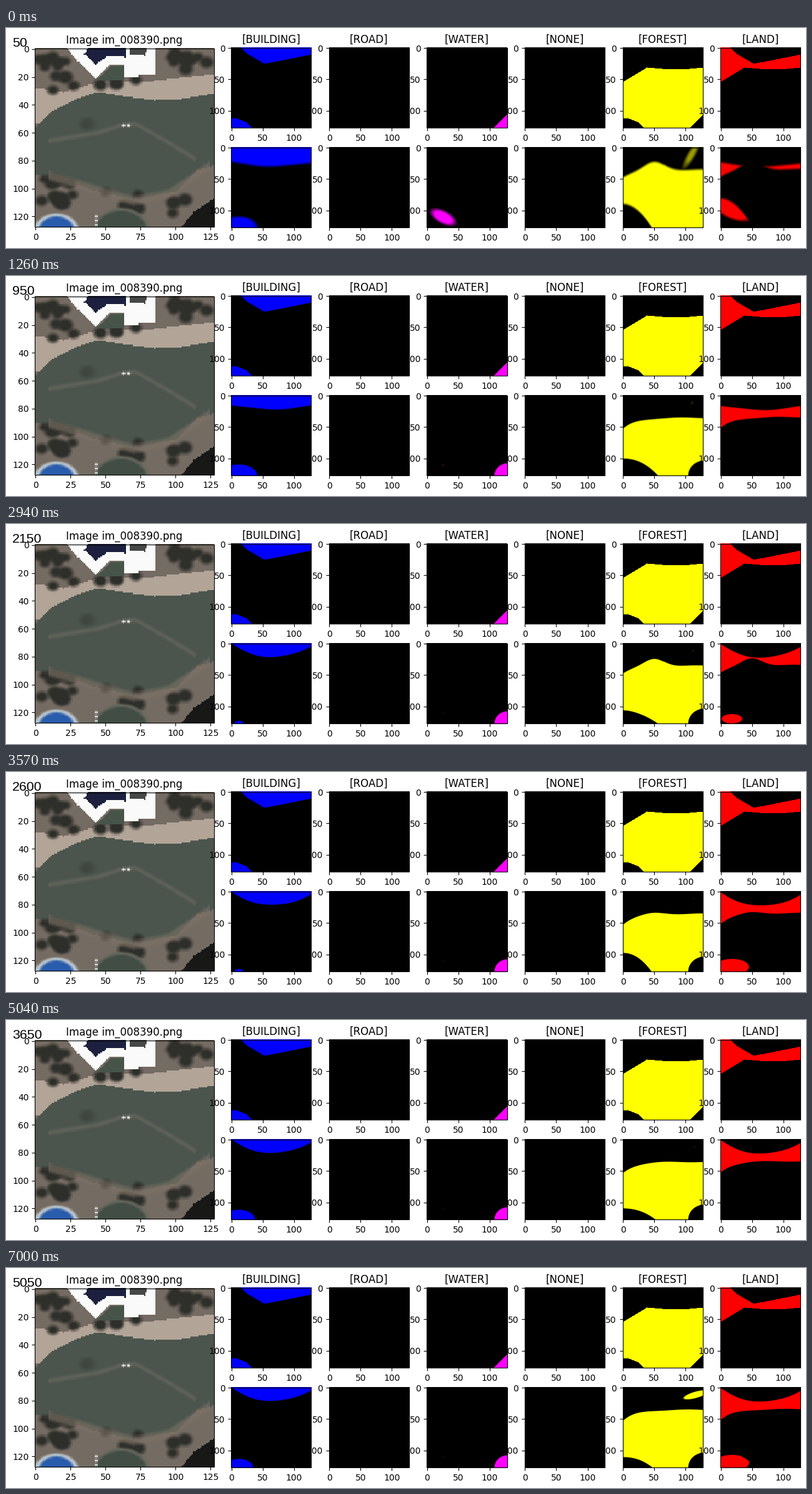
These frames come from a looping animation (1280x353 px, 7.07 s). A matplotlib script:

```python
import numpy as np
import matplotlib.pyplot as plt
from matplotlib.animation import FuncAnimation
from matplotlib.path import Path
from matplotlib.patches import Rectangle

W, H, DPI = 1280, 353, 100
FRAMES, STEP = 101, 70
N = 128
PT = DPI / 72
X, Y = np.meshgrid(np.arange(N), np.arange(N))
COLS = np.arange(N)
GRID = np.c_[X.ravel(), Y.ravel()]

NAMES = ["BUILDING", "ROAD", "WATER", "NONE", "FOREST", "LAND"]
COLORS = dict(BUILDING=(0, 0, 255), WATER=(255, 0, 255),
              FOREST=(255, 255, 0), LAND=(255, 0, 0))


def poly(*pts):
    return Path(pts).contains_points(GRID).reshape(N, N).astype(float)


def ellipse(cx, cy, rx, ry, tilt=0, size=1.0):
    """Approximate signed distance, positive inside."""
    a = np.radians(tilt)
    dx, dy = X - cx, Y - cy
    u = dx * np.cos(a) + dy * np.sin(a)
    v = dy * np.cos(a) - dx * np.sin(a)
    return (size - np.hypot(u / rx, v / ry)) * min(rx, ry)


def fill(d, soft=1.0):
    return np.clip(0.5 + d / soft, 0, 1)


def smooth(t):
    t = np.clip(t, 0, 1)
    return t * t * (3 - 2 * t)


def swing(i, peak, period):
    return np.cos(2 * np.pi * (i - peak) / period)


def tint(mask, color):
    return (mask[..., None] * np.array(color)).astype(np.uint8)


def truth():
    roof = np.interp(COLS, [15, 24, 53, 127], [0, 9, 26, 11], left=-1)
    top = np.interp(COLS, [0, 38, 75, 95, 127], [55, 32, 35, 35, 32])
    base = np.interp(COLS, [0, 10, 25, 33], [112, 113, 119, 128], right=N)
    pond = X + Y > 233
    return dict(BUILDING=(Y < roof) | (Y > base), WATER=pond,
                FOREST=(Y >= top) & (Y <= base) & ~pond,
                LAND=(Y >= roof) & (Y < top))


def predict(i):
    """Class masks that settle towards the truth as training goes on."""
    p = i / (FRAMES - 1)
    early = max(0, 1 - i / 14)
    soft = 1 + 4 * (1 - p) ** 6
    phase = np.random.default_rng(i).uniform(0, 2 * np.pi, 3)
    ripple = [0.7 * np.sin(COLS / 14 + a) for a in phase]

    # boundaries between the classes, as heights along x
    bend = 6 + 14 * smooth((i - 28) / 14)
    roof = 22 + 8 * early - bend * ((COLS - 66) / 64) ** 2 + ripple[0]
    swell = 13 * max(0, swing(i, 0, 42)) * (1 - p ** 3)
    top = (36 + (18 - swell / 2) * np.exp(-COLS / 20)
           - swell * np.exp(-((COLS - 50) / 22) ** 2) + ripple[1])
    beat = swing(i, 42, 30)
    reach = 52 - 8 * p + 16 * beat
    base = 96 + 7 * p + 8 * beat + 28 * (COLS / reach) ** 2 + ripple[2]

    # patches that come and go
    grow = max(0.05, min(1, i / 10))
    pond = ellipse(N, N, 21, 20, size=grow)
    bank = ellipse(N, N, 25, 24, size=grow)
    annex = ellipse(12, N, 26, 16, size=0.75 - 0.5 * swing(i, 47, 75))
    stray = ellipse(26, 111, 20, 9, 28, early)
    edge = max(0, 1 - min(i, FRAMES - 1 - i) / 12)
    streak = ellipse(108 + 7 * p, 12, 20, 5, 44 * p - 60, edge)
    settle = smooth(i / 30)
    patch = ellipse(18, 92 + 28 * settle, 32 - 8 * settle, 17 - 6 * settle,
                    28 * (1 - settle), 0.15 + swing(i, 0, 50))

    wood = np.minimum(np.minimum(Y - top, base - Y), -bank)
    strip = np.minimum(Y - roof, top - Y) - 1
    return dict(
        BUILDING=fill(np.maximum(roof - Y, annex), soft),
        WATER=fill(np.maximum(pond, stray), soft),
        FOREST=np.maximum(fill(wood, soft),
                          (0.6 + 0.4 * p) * fill(streak, soft)),
        LAND=fill(np.maximum(strip, np.minimum(patch, Y - base + 9)), soft),
    )


def aerial():
    """Simplified view from above, in flat tones."""
    img = np.full((N, N, 3), (116, 107, 98), float)
    rng = np.random.default_rng(8)
    white, tree = (250, 250, 250), (46, 47, 42)

    def paint(mask, color):
        img[:] = img * (1 - mask[..., None]) + mask[..., None] * np.array(color)

    def spot(cx, cy, rx, ry, color, soft=2):
        paint(fill(ellipse(cx, cy, rx, ry), soft), color)

    def trail(xs, ys, color, width):
        line = np.interp(COLS, xs, ys)
        mask = fill(width - abs(Y - line), 3) * (X >= xs[0]) * (X <= xs[-1])
        paint(mask * 0.6, color)

    def grove(count, x0, x1, y0, y1):
        for x, y, r in rng.uniform((x0, y0, 3), (x1, y1, 5.5), (count, 3)):
            spot(x, y, r, r * 0.85, tree, 3)

    paint(poly((-1, 28), (20, 31), (45, 24), (85, 23), (129, 18),
               (129, 36), (-1, 54)), (178, 164, 151))
    paint(poly((-1, 57), (12, 45), (30, 36), (45, 31), (62, 34), (85, 37),
               (105, 36), (129, 32), (129, 83), (115, 87), (100, 102),
               (70, 108), (40, 101), (22, 94), (-1, 90)), (75, 85, 77))

    grove(12, 2, 34, 3, 30)
    grove(4, 45, 72, 22, 26)
    grove(12, 90, 126, 2, 15)
    grove(16, 2, 27, 93, 112)
    grove(8, 46, 110, 102, 118)

    # house
    paint(poly((22, -1), (85, -1), (85, 18), (74, 18), (73, 20), (64, 20),
               (64, 11), (54, 11), (43, 21), (30, 9)), white)
    paint(poly((38, -1), (64, -1), (64, 6), (52, 5), (43, 11), (35, 4)),
          (28, 32, 62))
    paint(poly((68, -1), (80, -1), (78, 5), (68, 4)), (70, 72, 72))
    paint(poly((45, 22), (55, 12), (63, 12), (63, 22)), (70, 84, 74))

    # meadow marks
    trail([10, 45, 64, 72, 98, 114], [66, 60, 54, 54, 69, 79],
          (118, 112, 103), 1.2)
    trail([10, 50, 70, 95, 124], [91, 103, 109, 104, 84], (126, 114, 102), 3)
    spot(37, 54, 5, 4, (62, 70, 63), 4)
    for x in (63, 66.5):
        spot(x, 55, 1, 0.8, white, 1)

    # round bed, pool and dark pond
    spot(61, 132, 21, 18, (104, 104, 94))
    spot(61, 132, 19, 16, (66, 78, 69))
    spot(15, 131, 16, 13, (195, 204, 210))
    spot(15, 131, 13, 11, (42, 92, 172))
    paint(poly((103, 129), (113, 117), (129, 106), (129, 129)), (24, 24, 22))
    for y in (120, 123, 126):
        spot(43.5, y, 0.8, 0.8, white, 1)
    return img.astype(np.uint8)


fig = plt.figure(figsize=(W / DPI, H / DPI), dpi=DPI, facecolor="white")
ax = fig.add_axes([0, 0, 1, 1])
ax.axis("off")
layer = 0


def panel(x, y, size, img, xticks, yticks, title=None):
    """One framed picture with ticks, placed in pixels."""
    global layer
    layer += 1
    z = layer
    pic = ax.imshow(img, extent=(x, x + size, y + size, y), aspect="auto",
                    interpolation="nearest", zorder=z)
    ax.add_patch(Rectangle((x, y), size, size, fill=False, ec="black",
                           lw=0.8, zorder=z + 0.1))

    def pos(start, ticks):
        return [start + (t + 0.5) * size / N for t in ticks]

    px, py = pos(x, xticks), pos(y, yticks)
    mark = dict(ls="", color="black", ms=3.5, mew=0.8, zorder=z + 0.2)
    ax.plot(px, [y + size] * len(px), marker=3, **mark)
    ax.plot([x] * len(py), py, marker=0, **mark)
    gap = 7 * PT
    for p, t in zip(px, xticks):
        ax.text(p, y + size + gap, str(t), ha="center", va="top",
                fontsize=10, zorder=z + 0.3)
    for p, t in zip(py, yticks):
        ax.text(x - gap, p, str(t), ha="right", va="center_baseline",
                fontsize=10, zorder=z + 0.3)
    if title:
        ax.text(x + size / 2, y - 6 * PT, title, ha="center", va="baseline",
                fontsize=12, zorder=z + 0.3)
    return pic


panel(46.3, 32.7, 286.5, aerial(), range(0, 126, 25), range(0, 121, 20),
      "Image im_008390.png")
blank = np.zeros((N, N, 3), np.uint8)
labels = truth()
live = {}
for k, name in enumerate(NAMES):
    left = 360.1 + 156.6 * k
    ticks = (0, 50, 100)
    known = tint(labels[name], COLORS[name]) if name in COLORS else blank
    panel(left, 31.9, 128.2, known, ticks, ticks, f"[{name}]")
    live[name] = panel(left, 191.9, 128.2, blank, ticks, ticks)

counter = ax.text(10.2, 30, "", family="Liberation Sans", fontsize=15.3,
                  va="baseline", zorder=99)
ax.set_xlim(0, W)
ax.set_ylim(H, 0)


def update(i):
    counter.set_text(str(50 * (i + 1)))
    for name, mask in predict(i).items():
        live[name].set_data(tint(mask, COLORS[name]))
    return [counter, *live.values()]


anim = FuncAnimation(fig, update, frames=FRAMES, interval=STEP,
                     repeat=True, repeat_delay=0, blit=False)
plt.show()
```
